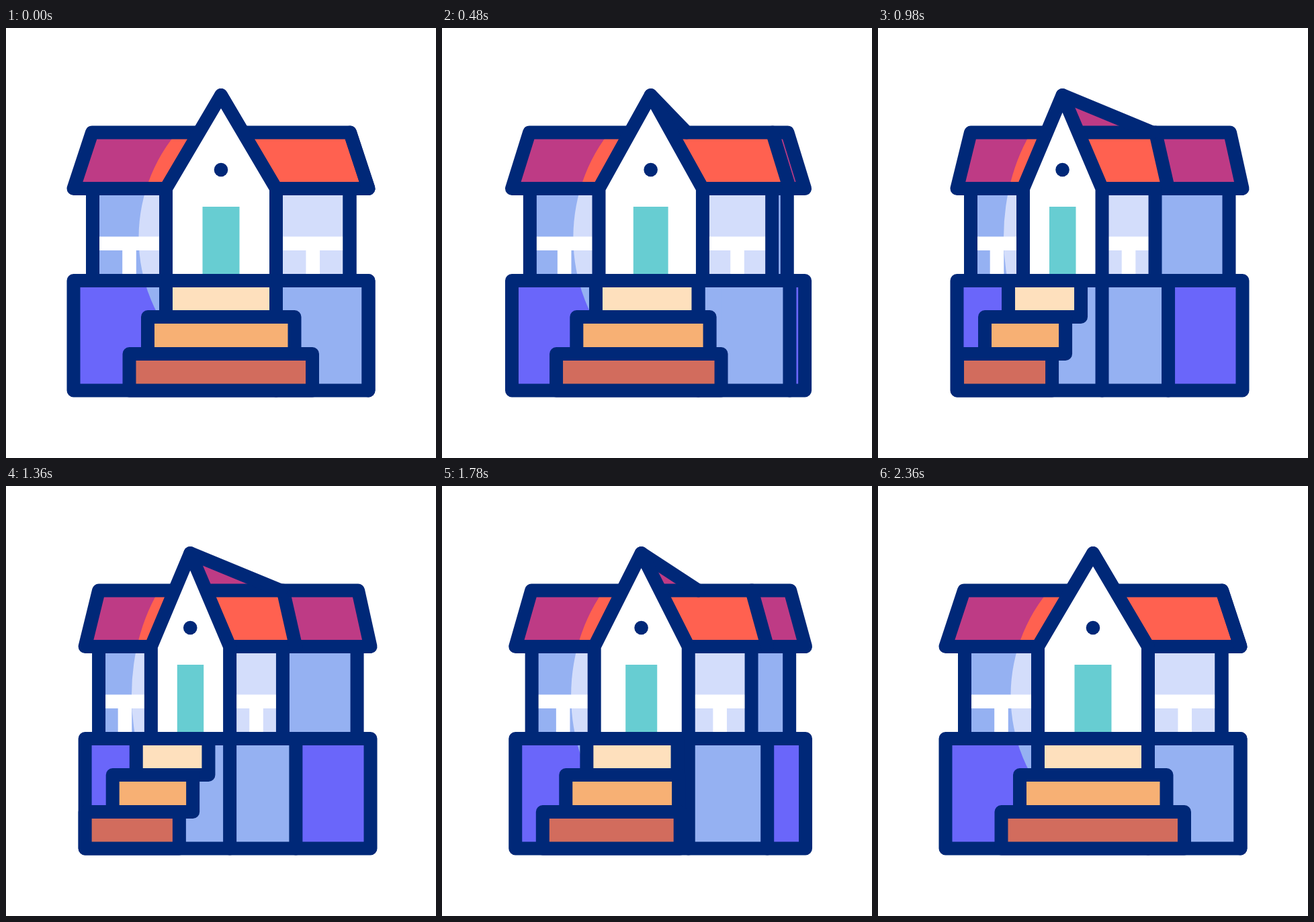
These frames come from a looping animation (640 px wide and 640 px high, 2400 ms). An HTML page with a canvas:

```html
<!DOCTYPE html>
<html lang="en">
<head>
<meta charset="utf-8">
<title>House turning</title>
<style>
  html, body { margin: 0; width: 100%; height: 100%; overflow: hidden; background: #fff; }
  canvas { display: block; width: 640px; height: 640px; }
</style>
</head>
<body>
<canvas id="stage"></canvas>
<script>
const LOOP = 2400, HALF = 1185, REACH = 1.02;
const NAVY = '#002878', SKY = '#95b1f2', PALE = '#d3ddfb', VIOLET = '#6a66fa',
      PLUM = '#be3b85', RED = '#ff6150', TEAL = '#67cdd2', WHITE = '#fff';
const RIDGE = 155.5, EAVES = 239, FLOOR = 376, GROUND = 539.5;

// x positions: [front view, turned view]
const X = {
  apex: [320, 274.5], ridge: [352.7, 408.6],
  roofTL: [128, 138], roofTR: [512, 524], roofBL: [100.5, 117.5], roofBR: [539.5, 542.5],
  edgeT: [512, 413], edgeB: [539.5, 432],
  wallL: [129, 138], wallR: [511.5, 522.5], wallEdge: [511.5, 412.5],
  postL: [238, 216], postR: [402, 333.5],
  doorL: [292.5, 255], doorR: [347.5, 294.5],
  step1L: [238, 194], step1R: [402, 302],
  step2L: [211, 159], step2R: [429.5, 279],
  step3L: [183.5, 118], step3R: [456, 259],
  shineX: [441.5, 361.7], shineR: [244, 174.7]
};

const canvas = document.getElementById('stage');
const ctx = canvas.getContext('2d');
const ratio = window.devicePixelRatio || 1;
canvas.width = canvas.height = 640 * ratio;
ctx.scale(ratio, ratio);
ctx.lineWidth = 20;
ctx.lineJoin = ctx.lineCap = 'round';
ctx.strokeStyle = NAVY;

const mix = (a, b, k) => a + (b - a) * k;
const clamp = v => Math.min(1, Math.max(0, v));
const bezier = (a, b, u) => 3 * a * u * (1 - u) ** 2 + 3 * b * u * u * (1 - u) + u ** 3;

function ease(x) {
  let lo = 0, hi = 1;
  for (let i = 0; i < 30; i++) {
    const mid = (lo + hi) / 2;
    if (bezier(0.787, 0.205, mid) < x) lo = mid; else hi = mid;
  }
  return bezier(0, 1, lo);
}

function trace(points, close) {
  ctx.beginPath();
  points.forEach(([x, y]) => ctx.lineTo(x, y));
  if (close) ctx.closePath();
}
function fill(color, ...points) {
  trace(points, true);
  ctx.fillStyle = color;
  ctx.fill();
}
function line(...points) {
  trace(points, false);
  ctx.stroke();
}
function outline(...points) {
  trace(points, true);
  ctx.stroke();
}
const box = (l, t, r, b) => [[l, t], [r, t], [r, b], [l, b]];

function draw(s) {
  const p = {};
  for (const key in X) p[key] = mix(...X[key], s);

  // a front panel: shade on the left, light inside the ellipse
  function panel(shade, light, points) {
    fill(shade, ...points);
    ctx.save();
    trace(points, true);
    ctx.clip();
    ctx.beginPath();
    ctx.ellipse(p.shineX, 312, p.shineR, 244, 0, 0, Math.PI * 2);
    ctx.fillStyle = light;
    ctx.fill();
    ctx.restore();
  }

  function windowBars(left, right) {
    const mid = (left + right) / 2;
    fill(WHITE, ...box(left, 310.5, right, 331));
    fill(WHITE, ...box(mid - 10.3, 330, mid + 10.3, FLOOR));
  }

  function step(color, left, right, top, bottom) {
    const shape = box(left, top, right, bottom);
    fill(color, ...shape);
    outline(...shape);
  }

  ctx.fillStyle = WHITE;
  ctx.fillRect(0, 0, 640, 640);

  // upper walls
  fill(SKY, ...box(p.wallEdge, EAVES, p.wallR, FLOOR));
  panel(SKY, PALE, box(p.wallL, EAVES, p.wallEdge, FLOOR));
  windowBars(p.wallL, p.postL);
  windowBars(p.postR, p.wallEdge);
  for (const x of [p.wallL, p.wallEdge, p.wallR]) line([x, EAVES], [x, FLOOR]);

  // roof
  fill(PLUM, [p.edgeT, RIDGE], [p.roofTR, RIDGE], [p.roofBR, EAVES], [p.edgeB, EAVES]);
  panel(PLUM, RED, [[p.roofTL, RIDGE], [p.edgeT, RIDGE], [p.edgeB, EAVES], [p.roofBL, EAVES]]);
  fill(PLUM, [p.apex, 100], [p.ridge, RIDGE], [p.apex, RIDGE]);
  outline([p.roofTL, RIDGE], [p.roofTR, RIDGE], [p.roofBR, EAVES], [p.roofBL, EAVES]);
  line([p.edgeT, RIDGE], [p.edgeB, EAVES]);
  line([p.apex, 100], [p.ridge, RIDGE]);

  // gable
  const gable = [[p.postL, FLOOR], [p.postL, EAVES], [p.apex, 100], [p.postR, EAVES], [p.postR, FLOOR]];
  fill(WHITE, ...gable);
  fill(TEAL, ...box(p.doorL, 266, p.doorR, FLOOR));
  line(...gable);
  ctx.beginPath();
  ctx.arc(p.apex, 211, 10.3, 0, Math.PI * 2);
  ctx.fillStyle = NAVY;
  ctx.fill();

  // base
  const porch = mix(p.step1R, p.postR, clamp((s - 0.2) / 0.3));
  fill(VIOLET, ...box(p.edgeB, FLOOR, p.roofBR, GROUND));
  panel(VIOLET, SKY, box(p.roofBL, FLOOR, p.edgeB, GROUND));
  fill(SKY, ...box(p.step3R, FLOOR, porch, GROUND));
  line([porch, FLOOR], [porch, GROUND]);
  line([p.edgeB, FLOOR], [p.edgeB, GROUND]);
  outline(...box(p.roofBL, FLOOR, p.roofBR, GROUND));

  // stairs
  step('#fee0bd', p.step1L, p.step1R, FLOOR, 430);
  step('#f7b074', p.step2L, p.step2R, 430, 485);
  step('#d26c5d', p.step3L, p.step3R, 485, GROUND);
}

let start;
function tick(now) {
  start ??= now;
  const t = (now - start) % LOOP;
  draw(REACH * ease(clamp(1 - Math.abs(t - HALF) / HALF)));
  requestAnimationFrame(tick);
}
draw(0);
requestAnimationFrame(tick);
</script>
</body>
</html>
```
